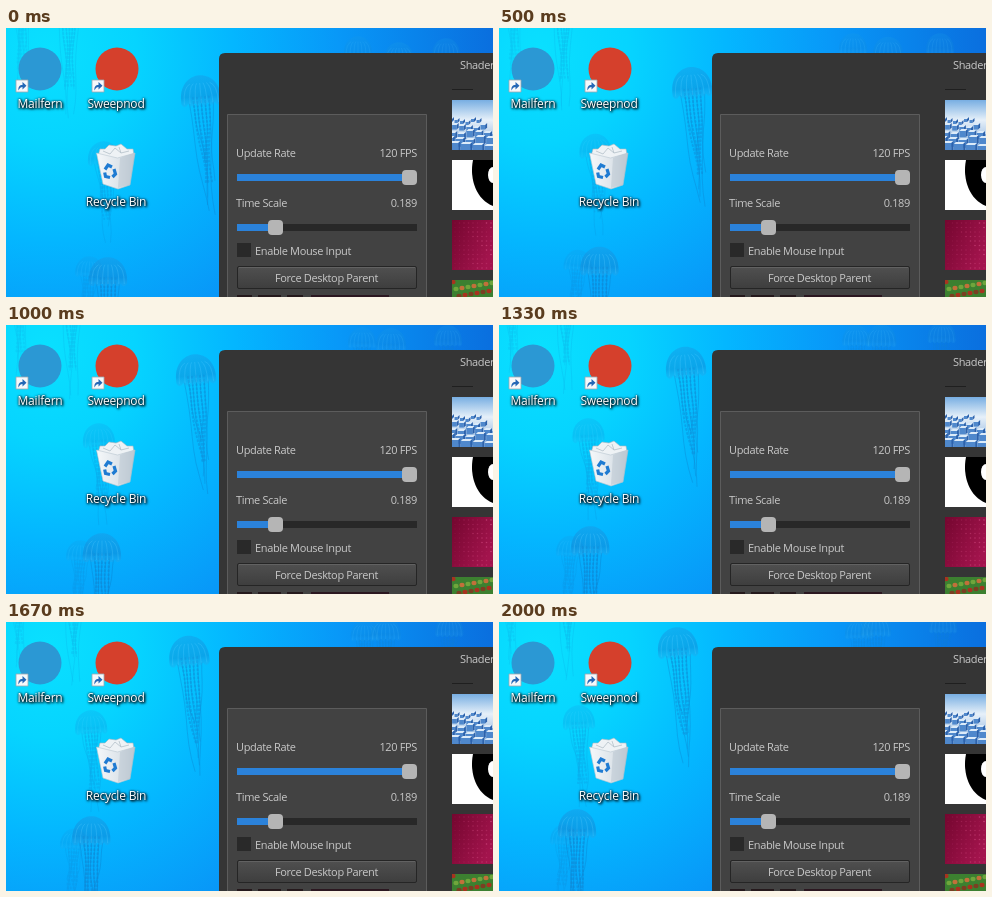
An HTML page for the animation above (2170 ms loop, 487 by 269 pixels).

```html
<!DOCTYPE html>
<html lang="en">
<head>
<meta charset="utf-8">
<title>Live wallpaper</title>
<style>
html, body { margin: 0; width: 100%; height: 100%; overflow: hidden; background: #08a8f6; }
svg { display: block; width: 487px; height: 269px; }
text { font-family: "Open Sans", "Noto Sans", sans-serif; }
.ui text { font-size: 11px; letter-spacing: -.35px; fill: #c8c8c8; }
.label { font-size: 12px; letter-spacing: -.2px; fill: #fff; text-anchor: middle; filter: drop-shadow(1px 1px 1px #000) drop-shadow(0 0 1px #012); }
</style>
</head>
<body>
<svg viewBox="0 0 487 269">
  <defs>
    <radialGradient id="water" gradientUnits="userSpaceOnUse" cx="40" cy="25" r="450">
      <stop stop-color="#0ae0ff"/><stop offset=".2" stop-color="#06d4ff"/>
      <stop offset=".42" stop-color="#04b6ff"/><stop offset=".65" stop-color="#0898f8"/>
      <stop offset="1" stop-color="#0a6ede"/>
    </radialGradient>
    <linearGradient id="bell" x2="0" y2="1">
      <stop stop-color="#1a9be6" stop-opacity=".6"/><stop offset=".7" stop-color="#1288d4" stop-opacity=".6"/><stop offset="1" stop-color="#2aa8ea" stop-opacity=".4"/>
    </linearGradient>
    <linearGradient id="btn" x2="0" y2="1">
      <stop stop-color="#505050"/><stop offset="1" stop-color="#3e3e3e"/>
    </linearGradient>
    <linearGradient id="sky" x2="0" y2="1">
      <stop stop-color="#78aee2"/><stop offset=".4" stop-color="#e6f0f9"/><stop offset="1" stop-color="#7fa9d8"/>
    </linearGradient>
    <linearGradient id="wine" x2="1" y2=".6">
      <stop stop-color="#74062f"/><stop offset="1" stop-color="#a3144d"/>
    </linearGradient>
    <linearGradient id="bin" x2="1">
      <stop stop-color="#f5f8fa"/><stop offset=".6" stop-color="#dde4ea"/><stop offset="1" stop-color="#aab7c2"/>
    </linearGradient>
    <clipPath id="c1"><path d="M446 72h41v50h-41z"/></clipPath>
    <clipPath id="c2"><path d="M446 132h41v50h-41z"/></clipPath>
    <clipPath id="c3"><path d="M446 252h41v17h-41z"/></clipPath>
    <g id="link">
      <path d="M.5.500h12v12h-12z" fill="#f6f8fa" stroke="#9aa6b2" stroke-width=".8"/>
      <path d="M3 11C2.500 7.500 4 5.500 7 5.500V2.500L11 6.300 7 10V7.500C5.500 7.500 4 8.500 3 11z" fill="#2467b6"/>
    </g>
  </defs>

  <path d="M0 0h487v269H0z" fill="url(#water)"/>
  <g id="sea" fill="none" stroke-linecap="round"></g>

  <circle cx="34" cy="41" r="21.500" fill="#2b98d4"/>
  <use href="#link" x="9.500" y="51.500"/>
  <circle cx="111" cy="41" r="21.500" fill="#d5402c"/>
  <use href="#link" x="85.500" y="51.500"/>
  <g>
    <path d="M92 128l2-7 5 0 4-4 7 1 5-2 6 5 6 0 1 6-5 5H97z" fill="#eef2f5" stroke="#a9b5bf" stroke-width=".6"/>
    <path d="M97 123l7 3 5-6 6 5 8-2M113 119l2 6" fill="none" stroke="#b4c0ca" stroke-width=".8"/>
    <path d="M90.500 125l21 5 17.500-5-5 32-12 4-15-5z" fill="url(#bin)" stroke="#b9c6d0" stroke-width=".6"/>
    <path d="M114 130l-2 30 11.500-4 5-31z" fill="#c3ced7" opacity=".75"/>
    <g fill="none" stroke="#1f7bd2" stroke-width="3.200">
      <path d="M99 141.500l3-4.500 4 2M108 141l1.500 5-3 3M104 149.500l-4.500-1-.8-4"/>
    </g>
  </g>
  <text class="label" x="34" y="80">Mailfern</text>
  <text class="label" x="110" y="80">Sweepnod</text>
  <text class="label" x="110" y="178">Recycle Bin</text>

  <g class="ui">
    <path d="M213 269V31q0-6 6-6h268v244z" fill="#353535"/>
    <path d="M221.500 270V86.500h199V270" fill="#424242" stroke="#5c5c5c"/>
    <text x="454" y="41">Shader</text>
    <path d="M446 61.500h21" stroke="#1f1f1f"/>

    <text x="230" y="129">Update Rate</text>
    <text x="411" y="129" text-anchor="end">120 FPS</text>
    <text x="230" y="179">Time Scale</text>
    <text x="411" y="179" text-anchor="end">0.189</text>
    <g id="sliders"></g>
    <path d="M231 215h14v14h-14z" fill="#292929"/>
    <text x="249" y="227">Enable Mouse Input</text>
    <rect x="231.500" y="238.500" width="179" height="22" rx="1.500" fill="url(#btn)" stroke="#252525"/>
    <path d="M233 239.500h176" stroke="#626262"/>
    <text x="320.500" y="254" text-anchor="middle">Force Desktop Parent</text>
    <path d="M231 267h15v2h-15zM252 267h23v2h-23zM281 267h16v2h-16z" fill="#25191c"/>
    <path d="M305 267h78v2h-78z" fill="#2b1720"/>

    <path d="M446 72h41v50h-41z" fill="url(#sky)"/>
    <g id="cubes" clip-path="url(#c1)"></g>
    <g clip-path="url(#c2)">
      <path d="M446 132h41v50h-41z" fill="#fff"/>
      <path d="M467 132C463 152 471 172 487 178v-46z" fill="#000"/>
      <ellipse cx="487" cy="147" rx="5" ry="8" fill="#fff"/>
    </g>
    <path d="M446 192h41v50h-41z" fill="url(#wine)"/>
    <g id="dots" fill="#e0578f"></g>
    <path d="M446 252h41v17h-41z" fill="#3c8030"/>
    <g id="tiles" clip-path="url(#c3)"></g>
  </g>
</svg>
<script>
const LOOP = 2170, FRAMES = 13;
const $ = id => document.getElementById(id);

function make(parent, tag, attrs) {
  const el = document.createElementNS("http://www.w3.org/2000/svg", tag);
  for (const k in attrs) el.setAttribute(k, attrs[k]);
  return parent.appendChild(el);
}

function slider(y, x) {
  const g = $("sliders");
  make(g, "rect", { x: 231, y, width: 180, height: 7, fill: "#282828" });
  make(g, "rect", { x: 231, y, width: x - 231, height: 7, fill: "#2b82da" });
  make(g, "rect", { x, y: y - 4, width: 15, height: 15, rx: 4, fill: "#b5b5b5" });
}
slider(146, 396);
slider(196, 262);

// Thumbnail details
for (let r = 0; r < 5; r++) for (let c = 0; c < 6; c++) {
  const s = 3 + r * 1.6, x = 443 + c * (s + 2.5) - r % 2 * 4, y = 91 + r * 6 + (c * 5 + r * 3) % 4;
  make($("cubes"), "path", { d: `M${x} ${y}h${s}v${s}h${-s}z`, fill: "#4f88cc" });
  make($("cubes"), "path", { d: `M${x} ${y}l2-2h${s}l-2 2z`, fill: "#dcebf9" });
  make($("cubes"), "path", { d: `M${x + s} ${y}l2-2v${s}l-2 2z`, fill: "#2c62ac" });
}
for (let r = 0; r < 11; r++) for (let c = 0; c < 9; c++)
  make($("dots"), "circle", { cx: 449 + c * 4.5, cy: 195 + r * 4.5, r: .8, opacity: .08 + (r * 7 + c * 5) % 6 * c / 70 });
for (let i = 0; i < 14; i++)
  make($("tiles"), "ellipse", {
    cx: 447 + i * 3, cy: 254 + i * 7 % 15, rx: 2.6, ry: 2.2,
    fill: ["#a8321f", "#6fa53c", "#7a3f22", "#c2703a"][i % 4]
  });

// x = x0 + vx t + ax t², y likewise; (x, y) is the top of the bell
const jellies = [
  { w: 34, len: 100, a: .3, tilt: 0, x: [63, 3, 0], y: [-34, -16, 0] },
  { w: 28, len: 90, a: .25, tilt: 0, x: [16, -2, 0], y: [-46, -8, 0] },
  { w: 32, len: 80, a: .4, tilt: -3, x: [97, -1, -4], y: [113, -15, 0] },
  { w: 28, len: 60, a: .35, tilt: 3, x: [84, -9, 0], y: [228, -13, 0] },
  { w: 38, len: 100, a: .9, tilt: 0, x: [102, 0, -6], y: [229, -21, 0] },
  { w: 40, len: 115, a: .8, tilt: -5, x: [193, -2, -3], y: [47, -15, -3] },
  { w: 28, len: 60, a: .4, tilt: 0, x: [352, 4, 0], y: [8, -6, 0] },
  { w: 30, len: 60, a: .45, tilt: 0, x: [393, -8, 0], y: [14, -11, 0] },
  { w: 28, len: 60, a: .4, tilt: 0, x: [440, 2, 0], y: [10, -10, 0] }
];
for (const j of jellies) {
  j.g = make($("sea"), "g", { opacity: j.a });
  j.legs = make(j.g, "path", { stroke: "#0f82cc", "stroke-width": .9, opacity: .5 });
  j.arms = make(j.g, "path", { stroke: "#1280cc", "stroke-width": 2, opacity: .5, "stroke-dasharray": "1 3" });
  j.bell = make(j.g, "path", { fill: "url(#bell)" });
  j.ribs = make(j.g, "path", { stroke: "#5cc8fa", "stroke-width": .8, opacity: .4 });
}

const at = ([p, v, a], t) => p + v * t + a * t * t;

function strand(x, y, len, phase, sway) {
  let d = `M${x.toFixed(1)} ${y.toFixed(1)}`;
  for (let s = 1; s <= 8; s++) {
    const q = s / 8, wave = Math.sin(phase + q * 6) * sway * q;
    d += `L${(x * (1 - q * .65) + wave).toFixed(1)} ${(y + len * q).toFixed(1)}`;
  }
  return d;
}

function drawJelly(j, n, t) {
  const r = j.w / 2, h = j.w * .7;
  j.g.setAttribute("transform", `translate(${at(j.x, t)} ${at(j.y, t)}) rotate(${j.tilt})`);
  let rim = `M${-r} ${h}C${-r * 1.15} ${-h * .32} ${r * 1.15} ${-h * .32} ${r} ${h}`;
  for (let i = 0; i < 6; i++) rim += `q${-r / 6} ${h * .2} ${-r / 3} 0`;
  let ribs = "", legs = "", arms = "";
  for (let i = -3; i <= 3; i++) {
    const end = i / 3.5 * r;
    ribs += `M${end * .6} ${h * .3}Q${end} ${h * .4} ${end} ${h}`;
    legs += strand(end * .7, h, j.len * (.75 + .25 * Math.cos(i * 4 + n)), i + n - t, 2.5);
  }
  for (let i = -2; i <= 2; i++) arms += strand(i * r * .2, h * .8, j.len * .75, n + i - t, 2.5);
  j.bell.setAttribute("d", rim + "Z");
  j.ribs.setAttribute("d", ribs);
  j.legs.setAttribute("d", legs);
  j.arms.setAttribute("d", arms);
}

let shown = -1;
function tick(now) {
  const ms = now % LOOP;
  let k = 0;
  while (k + 1 < FRAMES && Math.round((k + 1) / .06) * 10 <= ms) k++;
  if (k !== shown) {
    shown = k;
    jellies.forEach((j, n) => drawJelly(j, n, k / 6));
  }
  requestAnimationFrame(tick);
}
tick(0);
</script>
</body>
</html>
```
